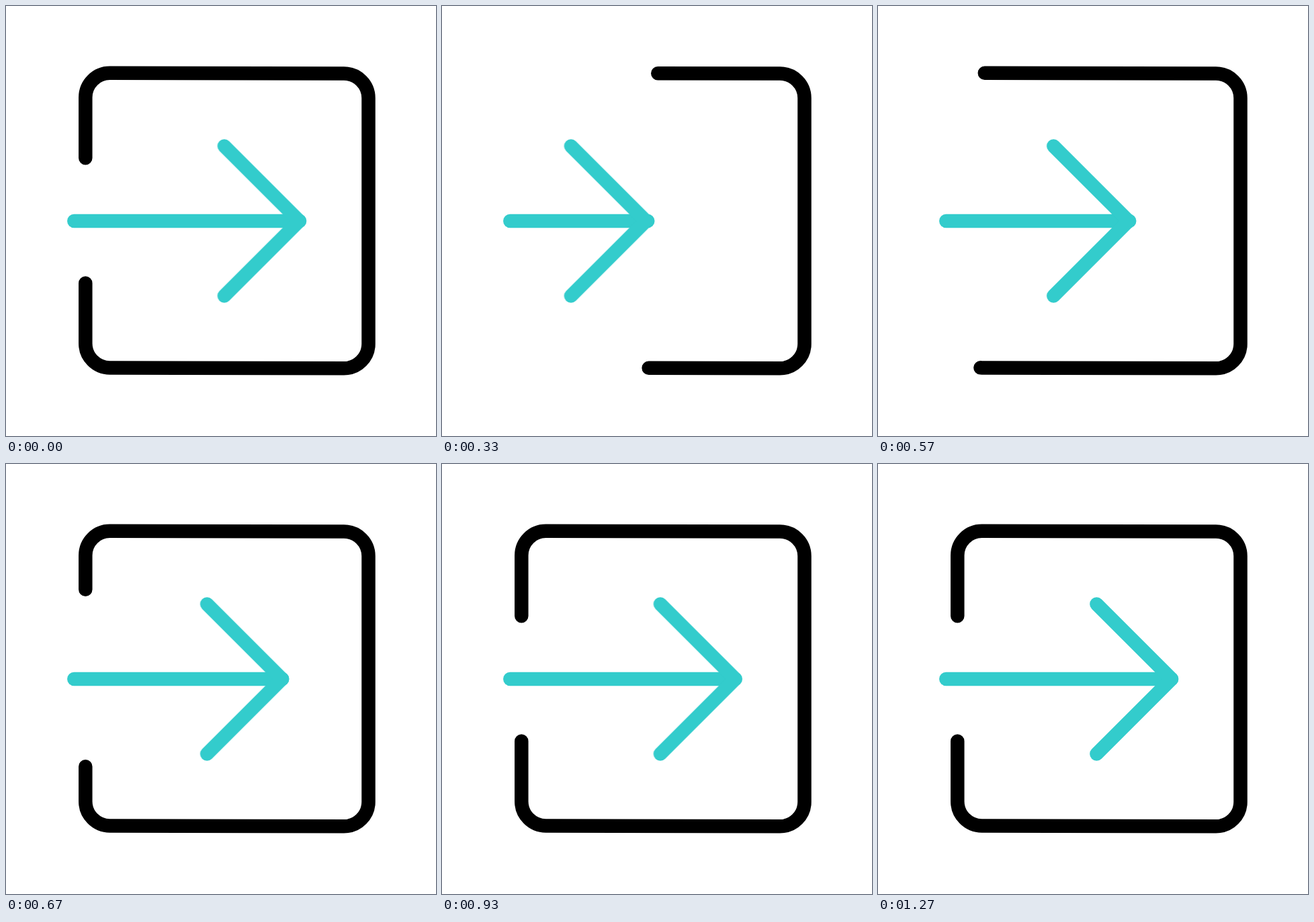
Recreate the animation shown at these times as an HTML page without scripts. Size 640 px wide and 640 px high, loop 2000 ms.

```html
<!DOCTYPE html>
<html lang="en">
<head>
<meta charset="utf-8">
<title>Enter icon</title>
<style>
  html, body { margin: 0; width: 100%; height: 100%; overflow: hidden; background: #fff; }
  svg { display: block; width: 100%; height: 100%; }
  path { fill: none; stroke-width: 20.5; stroke-linecap: round; stroke-linejoin: round; }

  .frame { stroke: #000; animation: frame 2s infinite; }
  .shaft, .head { stroke: #3cc; }
  .shaft { animation: shaft 2s infinite; }
  .head { animation: head 2s infinite; }

  .frame, .shaft, .head {
    --smooth: cubic-bezier(.333, 0, .667, 1);
    --glide: cubic-bezier(.167, .05, .833, .93);
    animation-timing-function: var(--smooth);
  }

  /* Both ends of the frame retract, then grow back. */
  @keyframes frame {
    0%, .15%, 37.75%, 100% { stroke-dasharray: 1471 3000; stroke-dashoffset: 0; }
    18.5% { stroke-dasharray: 837.5 3000; stroke-dashoffset: -324; }
  }

  /* The arrow pulls back, shoots in and rebounds once. */
  @keyframes head {
    0%, .15%, 46%, 62.65%, 100% { transform: none; }
    20.15% { transform: translateX(-146px); animation-timing-function: var(--glide); }
    54.35% { transform: translateX(-36px); }
  }
  @keyframes shaft {
    0%, .15%, 46%, 62.65%, 100% { stroke-dasharray: 335.7 1000; }
    20.15% { stroke-dasharray: 192.7 1000; animation-timing-function: var(--glide); }
    54.35% { stroke-dasharray: 300.4 1000; }
  }
</style>
</head>
<body>
<svg viewBox="0 0 640 640">
  <path class="frame" pathLength="1471" d="M118.3 226.2V136A36.2 36.2 0 0 1 154.5 99.8L503 100.6A36.5 36.5 0 0 1 539.5 137V502.6A36.5 36.5 0 0 1 503 539.3L154.5 538.4A36.2 36.2 0 0 1 118.3 502.2V412.4"/>
  <path class="shaft" d="M101.3 320H437"/>
  <path class="head" d="M325.4 208.4L437 320L325.4 431.6"/>
</svg>
</body>
</html>
```
